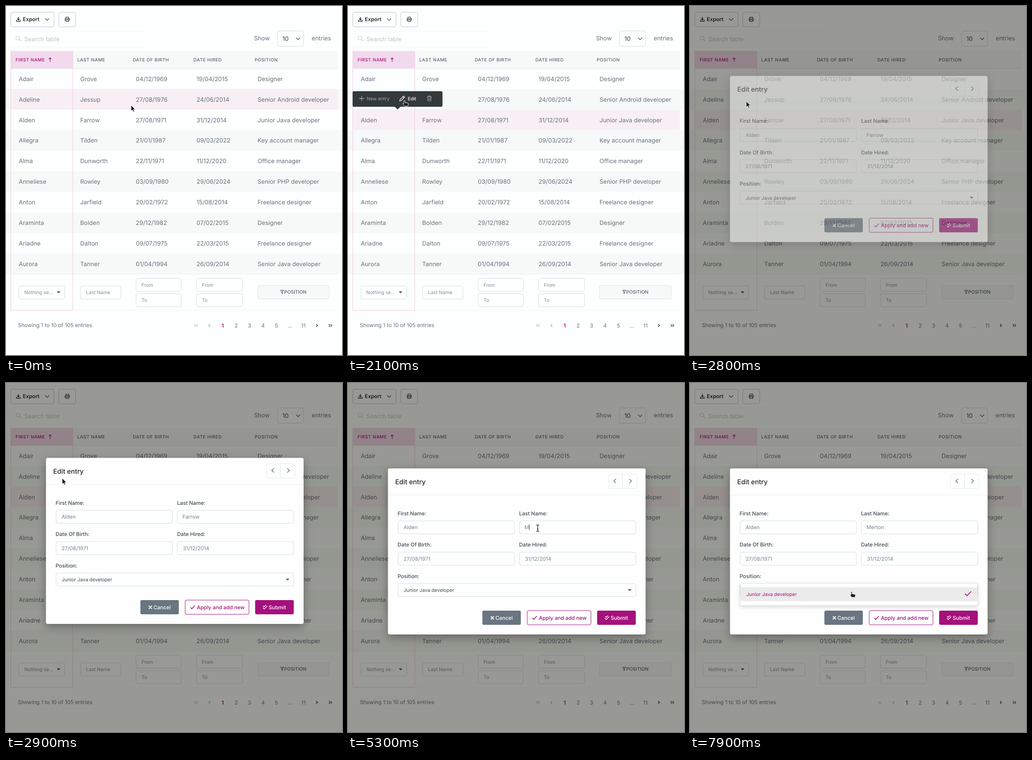
Recreate the animation shown at these times as an HTML page. Size 735 by 762 pixels, loop 8 s.

```html
<!DOCTYPE html>
<html lang="en">
<head>
<meta charset="utf-8">
<title>Editable table</title>
<style>
html, body { margin: 0; width: 100%; height: 100%; overflow: hidden; background: #fdfefe; }
svg { display: block; width: 735px; height: 762px; }
text { font-family: Inter, sans-serif; text-rendering: geometricPrecision; white-space: pre; }
</style>
</head>
<body>
<svg id="stage" viewBox="0 0 735 762" xmlns="http://www.w3.org/2000/svg"></svg>
<script>
const LOOP = 8000, STEP = 100;
const ROW_TOP = 136.5, ROW_H = 44.89;
const MAGENTA = '#a5107c', GREY = '#69717d', DARK = '#23272d', PAPER = '#fdfefe';

// x, vertical middle of the capitals, text, size, colour, weight, extra attributes
const text = (x, mid, s, size, fill = GREY, weight = 400, more = '') =>
  `<text x="${x}" y="${(mid + size * 0.364).toFixed(2)}" font-size="${size}" fill="${fill}" font-weight="${weight}" ${more}>${s}</text>`;
const box = (x, y, x2, y2, fill, stroke = 'none', r = 0, more = '') =>
  `<rect x="${x}" y="${y}" width="${x2 - x}" height="${y2 - y}" rx="${r}" fill="${fill}" stroke="${stroke}" ${more}/>`;
const line = (d, stroke, w = 1, more = '') =>
  `<path d="${d}" fill="none" stroke="${stroke}" stroke-width="${w}" ${more}/>`;
const fill = (d, color) => `<path d="${d}" fill="${color}"/>`;
const chevron = (x, y, dx, dy, color, w = 1.4) => {
  const d = dx ? `M${x - dx / 2} ${y - 4}l${dx} 4l${-dx} 4` : `M${x - 4} ${y - dy / 2}l4 ${dy}l4 ${-dy}`;
  return line(d, color, w, 'stroke-linecap="round" stroke-linejoin="round"');
};
const triangle = (x, y, color) => fill(`M${x - 4} ${y - 2}h8l-4 4.4z`, color);
const field = (x, y, x2, y2, label = '', size = 10.55, color = '#868d96') =>
  box(x, y, x2, y2, PAPER, '#d9dde1', 4) + text(x + 12, (y + y2) / 2, label, size, color);

const columns = [27.9, 162.3, 284, 416.7, 550.2];
const people = [
  ['Adair', 'Grove', '04/12/1969', '19/04/2015', 'Designer'],
  ['Adeline', 'Jessup', '27/08/1976', '24/06/2014', 'Senior Android developer'],
  ['Alden', 'Farrow', '27/08/1971', '31/12/2014', 'Junior Java developer'],
  ['Allegra', 'Tilden', '21/01/1987', '09/03/2022', 'Key account manager'],
  ['Alma', 'Dunworth', '22/11/1971', '11/12/2020', 'Office manager'],
  ['Anneliese', 'Rowley', '03/09/1980', '29/06/2024', 'Senior PHP developer'],
  ['Anton', 'Jarfield', '20/02/1972', '15/08/2014', 'Freelance designer'],
  ['Araminta', 'Bolden', '29/12/1982', '07/02/2015', 'Designer'],
  ['Ariadne', 'Dalton', '09/07/1975', '22/03/2015', 'Freelance designer'],
  ['Aurora', 'Tanner', '01/04/1994', '26/09/2014', 'Senior Java developer']
];
const edited = people[2], newName = 'Merton';

function toolbar() {
  return box(10.5, 13.5, 105, 45.5, PAPER, '#bcc2c8', 4) +
    line('M27 24.2v6M24.4 27.8l2.6 2.6l2.6 -2.6', DARK, 1.5) + line('M22.8 30.5v2.8h8.4v-2.8', DARK, 1.4) +
    text(36.8, 29.3, 'Export', 11.4, DARK, 600) + chevron(90, 29.5, 0, 4, '#555c64') +
    box(115.5, 13.5, 152.5, 45.5, PAPER, '#c4cacf', 4) +
    line('M131 27.5v-3.2h6v3.2M131 31.5h-1.7v-3.8h9.4v3.8h-1.7M131 30.2h6v3.5h-6z', '#343a42', 1.2) +
    line('M10 54.5H302M10 89.5H302', '#f3f5f5') +
    '<circle cx="26" cy="70" r="4" fill="none" stroke="#c6cbd0" stroke-width="1.2"/>' +
    line('M29 73l4 4', '#c6cbd0', 1.3) +
    text(40, 72, 'Search table', 13.05, '#c0c4c9') +
    text(542.5, 70, 'Show', 13.05) + box(594, 54.5, 651, 88, PAPER, '#d3d8dc', 4) +
    text(604.8, 71.5, '10', 13.05, '#343a42') + chevron(639, 71.5, 0, 4, '#555c64') +
    text(668.8, 70, 'entries', 13.05);
}

function table() {
  const head = (x, s, color = '#58626c') =>
    text(x, 117.5, s, 9.75, color, 500, 'letter-spacing=".52"');
  let out = box(10, 98, 726, 136.5, '#f7f9f9') + box(11, 98, 147, 136.5, '#f3d9ec');
  people.forEach((_, i) => {
    if (i % 2) out += box(0, ROW_TOP + i * ROW_H, 735, ROW_TOP + (i + 1) * ROW_H, '#f6f9f8');
  });
  out += `<rect id="hover" x="10.5" width="715.5" height="${ROW_H}" fill="#f8eff4"/>`;
  out += line('M10 136.5H726', '#e0e5e7') + line('M10 585.5H726', '#eceff0') + line('M146 664.5H726', '#f4f6f6');
  out += line('M10.5 98V664.5H146V136', '#edcbe1');
  out += head(21, 'FIRST NAME', MAGENTA) + line('M96.5 122v-9M93.5 116l3 -3l3 3', MAGENTA, 1.2);
  out += head(155.9, 'LAST NAME') + head(277.4, 'DATE OF BIRTH') + head(410.1, 'DATE HIRED') + head(543.9, 'POSITION');
  people.forEach((p, i) => p.forEach((s, c) => {
    out += text(columns[c], 159 + i * ROW_H, s, 13.05);
  }));
  return out;
}

function filters() {
  let out = field(28, 611, 128.5, 640, 'Nothing se...') + triangle(115, 625, '#555c64') +
    field(163, 611, 251.5, 640, 'Last Name');
  for (const [a, b] of [[284.5, 383.5], [416.5, 517.5]])
    out += field(a, 594.5, b, 623, 'From') + field(a, 628, b, 656.5, 'To');
  return out + box(550.5, 610.5, 707, 639.5, '#f7f9f9', '#dee4e6', 2) +
    line('M600.8 620.6h6.4l-2.4 3.4v4l-1.6 -1.2v-2.8z', '#56616f', 1.1, 'stroke-linejoin="round"') +
    text(608.6, 624.7, 'POSITION', 10.2, '#56616f', 500);
}

function pager() {
  const mid = 697.5, pale = '#b9bec4', dark = '#3f464e';
  const small = (x, dir, color, w) => line(`M${x - dir * 1.5} ${mid - 3}l${dir * 3} 3l${-dir * 3} 3`, color, w);
  let out = text(26, 697, 'Showing 1 to 10 of 105 entries', 11.65);
  out += small(413.5, -1, pale, 1.1) + small(417.5, -1, pale, 1.1) + small(445, -1, '#9ca2a9', 1.2);
  ['1', '2', '3', '4', '5', '...', '11'].forEach((s, i) => {
    out += text(474 + i * 29.45, 697.5, s, 11.6, i ? GREY : MAGENTA, i ? 400 : 600, 'text-anchor="middle"');
  });
  return out + small(680, 1, dark, 1.7) + small(707.5, 1, dark, 1.2) + small(711.5, 1, dark, 1.2);
}

function popover() {
  const dim = '#a3a8aa';
  return box(10, 186, 206.7, 220, '#343a3c', 'none', 3) + fill('M102 219.5h13l-6.5 6.5z', '#343a3c') +
    line('M24.5 202h11M30 196.5v11', dim, 1.3) + text(41, 202.3, 'New entry', 10.2, dim) +
    `<g id="edit">${line('M113 207.5l1 -3.5l7.5 -7.5l2.5 2.5l-7.5 7.5zM119.5 198.5l2.5 2.5', 'currentColor', 1.2)}${
      text(130.8, 202.3, 'Edit', 10.2, 'currentColor', 500)}</g>` +
    line('M173 198.3h10M176 198v-1.7h4v1.7M174 198.5l.6 8.5h6.8l.6 -8.5M176.7 200.5v4.5M179.3 200.5v4.5', dim, 1.1);
}

function modal() {
  const label = (x, y, s) => text(x, y, s, 11.5, '#434b55', 500);
  const input = (x, x2, y, s) => field(x, y, x2, y + 28.5, s, 11.4, '#7b828b');
  return box(87.5, 186.5, 651, 549, '#fdfefd', 'none', 4, 'filter="url(#soft)"') +
    text(103.3, 215.5, 'Edit entry', 14.5, DARK, 500) +
    box(570, 199, 632, 230.5, PAPER, '#eaeced', 4) + line('M600.5 199v31.5', '#e3e6e8') +
    chevron(583.5, 214, -4.5, 0, '#5b626a', 1.3) + chevron(618, 214, 4.5, 0, '#5b626a', 1.3) +
    line('M88 244.5H651', '#eef0f0') +
    label(108.5, 285, 'First Name:') + label(374.3, 285, 'Last Name:') +
    label(108.5, 353.3, 'Date Of Birth:') + label(374.3, 353.3, 'Date Hired:') + label(108.5, 421.8, 'Position:') +
    input(109.5, 364, 301, edited[0]) + input(375, 629.5, 301, '') +
    '<rect id="mark" x="386" y="308" height="15" fill="#3584e4"/>' +
    text(386, 315.2, '', 11.4, '#7b828b', 400, 'id="last"') +
    '<rect id="caret" y="308.5" width="1" height="13" fill="#4b525a"/>' +
    input(109.5, 364, 369.3, edited[2]) + input(375, 629.5, 369.3, edited[3]) +
    box(109.5, 438, 629.5, 466.5, PAPER, '#d9dde1', 4) +
    text(122, 452.6, edited[4], 10.5, '#434a52') + triangle(616, 452.2, '#555c64') +
    box(294, 497, 378, 528, '#697580', 'none', 3) + line('M312.5 509.5l6.5 6.5m0 -6.5l-6.5 6.5', '#fff', 2) +
    text(322.5, 513, 'Cancel', 11.4, '#fff', 500) +
    box(392, 497, 531.5, 528, PAPER, MAGENTA, 3) + line('M403.5 513l3 3l6.5 -7', MAGENTA, 1.6) +
    text(417.5, 513, 'Apply and add new', 11.4, MAGENTA, 500) +
    box(545, 497, 629.5, 528, MAGENTA, 'none', 3) +
    line('M562 513.5l3 3l6.5 -6.5M562.5 509.5l2.3 2.3l4 -4', '#fff', 1.5) +
    text(574.5, 513, 'Submit', 11.4, '#fff', 500);
}

function dropdown() {
  return box(110, 437.5, 629, 485.5, PAPER, '#e3e5e6', 1, 'filter="url(#low)"') +
    line('M110 441V465M629 441V465', '#c5c8ca') + box(110.5, 446, 628.5, 476.5, '#ebebeb') +
    text(123.5, 461.5, edited[4], 10.5, MAGENTA) + line('M601.5 460l4.5 4.5l9 -9.5', MAGENTA, 1.8);
}

const shadow = (id, dy, blur, a) =>
  `<filter id="${id}" x="-10%" y="-30%" width="120%" height="180%"><feDropShadow dx="0" dy="${dy}" stdDeviation="${blur}" flood-opacity="${a}"/></filter>`;

const stage = document.getElementById('stage');
stage.innerHTML =
  `<defs>${shadow('soft', 6, 10, 0.32)}${shadow('low', 3, 4, 0.15)}</defs>` +
  box(0, 0, 735, 762, PAPER) + toolbar() + table() + filters() + pager() +
  `<g id="pop">${popover()}</g>` +
  '<rect id="shade" width="735" height="762" fill="rgb(12,14,2)" fill-opacity=".42"/>' +
  `<g id="modal">${modal()}</g><g id="list">${dropdown()}</g>` +
  `<g id="cursor">
    <path id="arrow" d="M0 0V13L3 10.2L5 14.6L7.1 13.7L5.2 9.4H9.2Z" fill="#1c1c1c" stroke="#fff" stroke-width=".8"/>
    <path id="hand" d="M-1.3 .9Q0 -.9 1.3 .9V5L7 6Q8.6 6.3 8.4 8L7.6 12.5H.4L-3.4 7.6Q-3.6 6 -1.9 6.4L-1.3 7Z" fill="#1c1c1c" stroke="#fff" stroke-width=".9"/>
    <path id="beam" d="M-3 -7Q0 -7 0 -5.5Q0 -7 3 -7M0 -5.5V5.5M-3 7Q0 7 0 5.5Q0 7 3 7M-1.6 2H1.6" fill="none" stroke="#2c2c2c" stroke-width="1.4"/>
  </g>`;

const el = {};
for (const id of ['hover', 'pop', 'edit', 'shade', 'modal', 'mark', 'last', 'caret', 'list', 'cursor', 'arrow', 'hand', 'beam'])
  el[id] = document.getElementById(id);

const path = [
  [0, 273.5, 216.5], [200, 273.5, 216.5], [300, 275, 229], [500, 284, 274], [600, 288, 279], [900, 297, 238],
  [1500, 297, 238], [1800, 215, 224], [2000, 135, 208], [2100, 123.5, 206], [2500, 123.5, 206],
  [2600, 123, 208], [3100, 123, 208], [3300, 135, 240], [3400, 157, 278], [3500, 262, 318],
  [3600, 367, 331], [3700, 398, 327], [4000, 415, 317], [6800, 415, 317], [7000, 400, 352],
  [7300, 353.5, 455.5], [LOOP, 353.5, 455.5]
];
const clamp = v => Math.max(0, Math.min(1, v));
const between = (t, a, b) => t >= a && t < b;
const show = (node, on) => node.setAttribute('visibility', on ? 'visible' : 'hidden');

function cursorAt(t) {
  const i = path.findIndex((p, k) => k && t < p[0]);
  const [a, x, y] = path[i - 1], [b, x2, y2] = path[i], u = (t - a) / (b - a);
  return [x + (x2 - x) * u, y + (y2 - y) * u];
}

// letters typed by the given time
const keys = [[5300, 1], [5600, 2], [5900, 3], [6000, 4], [6100, 6]];
const typed = t => keys.reduce((n, [at, count]) => (t >= at ? count : n), 0);

function draw(t) {
  const [x, y] = cursorAt(t);
  el.cursor.setAttribute('transform', `translate(${x} ${y})`);
  const beam = between(t, 3700, 5400) || between(t, 6900, 7000);
  const hand = between(t, 1900, 2600) || t >= 7300;
  show(el.beam, beam);
  show(el.hand, hand);
  show(el.arrow, !beam && !hand && !between(t, 5400, 6900));

  const row = t >= 900 ? 2 : Math.floor((y - ROW_TOP) / ROW_H);
  el.hover.setAttribute('y', ROW_TOP + row * ROW_H);

  el.pop.setAttribute('opacity', t < 1300 || t >= 2600 ? 0 : t < 1400 ? 0.6 : 1);
  el.edit.setAttribute('color', t >= 2000 ? '#fff' : '#a3a8aa');

  show(el.shade, t >= 2600);
  const slide = clamp((t - 2750) / 620);
  el.modal.setAttribute('transform', `translate(0 ${-40 * (1 - slide) ** 2})`);
  el.modal.setAttribute('opacity', clamp((t - 2700) / 200));

  const n = typed(t), marked = between(t, 4500, 5300);
  el.last.textContent = n ? newName.slice(0, n) : edited[1];
  el.last.setAttribute('fill', marked ? '#fff' : '#7b828b');
  const width = el.last.getComputedTextLength();
  el.mark.setAttribute('width', width);
  show(el.mark, marked);
  el.caret.setAttribute('x', n ? 386 + width : 416);
  show(el.caret, between(t, 4300, 4500) || between(t, 5300, 6700) || between(t, 7200, 7500));

  el.list.setAttribute('opacity', clamp((t - 7600) / 200));
}

const start = performance.now();
function tick() {
  const t = (performance.now() - start) % LOOP;
  draw(Math.floor(t / STEP) * STEP);
  requestAnimationFrame(tick);
}
tick();
</script>
</body>
</html>
```
